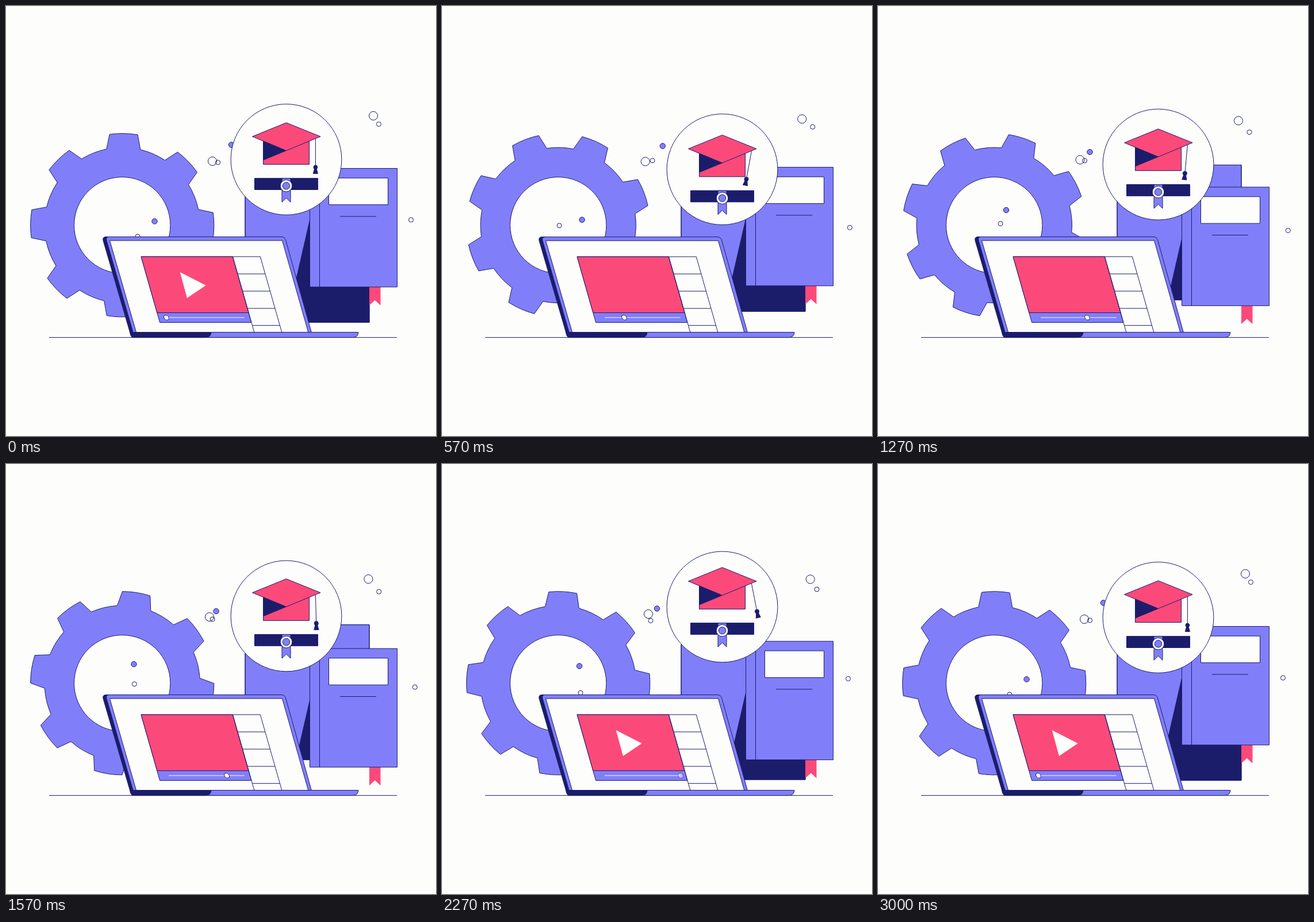
An HTML page with a canvas that plays this animation: 748 by 748 pixels, repeating every 3.03 s.

```html
<!DOCTYPE html>
<html lang="en">
<head>
<meta charset="utf-8">
<title>Online learning</title>
<style>
html, body { margin: 0; width: 100%; height: 100%; overflow: hidden; background: #fdfdfb; }
canvas { display: block; width: 748px; height: 748px; }
</style>
</head>
<body>
<canvas id="stage" width="748" height="748"></canvas>
<script>
const ctx = document.getElementById('stage').getContext('2d');
const WHITE = '#fdfdfb', PURPLE = '#807ff9', PINK = '#fb4a7a', NAVY = '#1b1d6b', LINE = '#1b1b70';
const LOOP = 3030, STEPS = 90, RAD = Math.PI / 180;
const KEYS = [0, 9, 25, 38, 55, 68];

const clamp = v => Math.max(0, Math.min(1, v));
const ease = v => { v = clamp(v); return v * v * (3 - 2 * v); };

// Smooth periodic curve through one value per key
function curve(n, vals) {
  const c = KEYS.length;
  const time = i => KEYS[(i + c) % c] + STEPS * Math.floor(i / c);
  const val = i => vals[(i + c) % c];
  const rate = i => (val(i + 1) - val(i)) / (time(i + 1) - time(i));
  const slope = i => {
    const a = time(i) - time(i - 1), b = time(i + 1) - time(i);
    return (rate(i - 1) * b + rate(i) * a) / (a + b);
  };
  n %= STEPS;
  let i = c - 1;
  while (KEYS[i] > n) i--;
  const h = time(i + 1) - time(i), u = (n - time(i)) / h, w = 1 - u;
  return val(i) * w * w * (1 + 2 * u) + val(i + 1) * u * u * (3 - 2 * u)
    + h * u * w * (slope(i) * w - slope(i + 1) * u);
}

function paint(fill, stroke) {
  if (fill) { ctx.fillStyle = fill; ctx.fill(); }
  if (stroke) { ctx.strokeStyle = stroke; ctx.stroke(); }
}

function poly(pts, fill, stroke = LINE) {
  ctx.beginPath();
  pts.forEach(([x, y]) => ctx.lineTo(x, y));
  ctx.closePath();
  paint(fill, stroke);
}

function box(x, y, w, h, fill, stroke = LINE) {
  ctx.beginPath();
  ctx.rect(x, y, w, h);
  paint(fill, stroke);
}

function disc(x, y, r, fill, stroke = LINE) {
  ctx.beginPath();
  ctx.arc(x, y, r, 0, 2 * Math.PI);
  paint(fill, stroke);
}

function line(x1, y1, x2, y2, color = LINE) {
  ctx.beginPath();
  ctx.moveTo(x1, y1);
  ctx.lineTo(x2, y2);
  paint(null, color);
}

function gear(n) {
  const x = 202.2, y = 381.3;
  ctx.beginPath();
  for (let i = 0; i < 8; i++) {
    const a = i * 45 - 89.1 + n * 4;
    ctx.arc(x, y, 135.2, (a - 32.4) * RAD, (a - 12.6) * RAD);
    ctx.arc(x, y, 159.6, (a - 8.8) * RAD, (a + 8.8) * RAD);
  }
  ctx.closePath();
  paint(PURPLE, LINE);
  disc(x, y, 83.7, WHITE);
}

const BUBBLES = [
  { r: 7.5, x: [639, 631, 624, 627, 634, 640.7], y: [191, 194, 198.5, 199.5, 200.5, 200.5] },
  { r: 4, x: [648.5, 646.5, 644, 646, 651, 652], y: [205.5, 208, 213, 219.5, 222.5, 218] },
  { r: 7.5, x: [359, 356.5, 351.5, 351.5, 356.5, 359], y: [270, 270.5, 270, 267.5, 264.5, 261] },
  { r: 4, x: [368.5, 368.5, 363, 359.5, 360, 363], y: [272, 269.5, 269, 269, 271, 272.5] },
  { r: 4, x: [229, 212.5, 202, 213, 232, 241], y: [401, 390, 377, 378.5, 388, 398] },
  { r: 4, x: [704.5, 706, 712.5, 713.3, 709, 706.5], y: [372, 379.5, 389.5, 390.5, 384, 373.5] },
  { r: 4.7, fill: PURPLE, x: [392, 389, 377.7, 368.5, 366, 374], y: [241.5, 240.5, 248, 254, 256, 251.5] },
  { r: 4.7, fill: PURPLE, x: [258.5, 253, 233.5, 223, 226, 239], y: [374.5, 374.5, 367, 355, 345.5, 351.5] }
];

function books(n) {
  const top = curve(n, [282.5, 277, 290, 315, 320, 308.3]);
  const low = curve(n, [550.3, 541.3, 521.5, 511.5, 523.5, 549]);
  const end = top + 206.3;

  box(416, low - 235, 216, 235, PURPLE);
  ctx.save();
  ctx.beginPath();
  ctx.rect(416, low - 235, 216, 235);
  ctx.clip();
  const from = top + 90;
  poly([[528.5, from], [528.5 - (600 - from) * 0.23, 600], [640, 600], [640, from]], NAVY);
  ctx.restore();
  box(416, low - 235, 216, 235, null);

  poly([[632, end], [651.5, end], [651.5, end + 32], [641.7, end + 23], [632, end + 32]], PINK, null);
  box(528.5, top, 152, 206.3, PURPLE);
  line(545.5, top, 545.5, end);
  box(561.5, top + 16.7, 103, 46.5, WHITE);
  line(581, top + 83.5, 644, top + 83.5);
}

function badge(n) {
  const wave = Math.sin(n * 4 * RAD);
  disc(487.5, 267 + 18.5 * wave, 96.4, WHITE);
  ctx.save();
  ctx.translate(0, 23.1 * wave);

  // Cap
  box(447.5, 231, 80, 44.5, PINK);
  poly([[447.5, 234.5], [487.5, 251.5], [447.5, 268]], NAVY);
  poly([[487.5, 203], [547, 227], [487.5, 251.5], [428.5, 227]], PINK);

  // Tassel
  ctx.save();
  ctx.translate(538.4, 231);
  ctx.rotate(11.2 * wave * RAD);
  line(0, 0, 0, 48);
  poly([[-1.5, 51], [1.5, 51], [4, 60.5], [-4, 60.5]], NAVY);
  disc(0, 49.5, 3.4, NAVY);
  ctx.restore();

  // Diploma
  box(432.5, 299.7, 110, 19.8, NAVY);
  poly([[480, 299.7], [495, 299.7], [495, 341.3], [487.5, 334], [480, 341.3]], PURPLE);
  disc(487.5, 312.8, 10.3, WHITE);
  disc(487.5, 312.8, 6.2, PURPLE);
  ctx.restore();
}

function laptop(n) {
  const press = Math.sin(clamp(n / 18) * Math.PI) ** 2;
  ctx.save();
  ctx.translate(0, 567.5);
  ctx.scale(1, 1 - 0.035 * press);
  ctx.translate(0, -567.5);

  // Lid
  ctx.beginPath();
  ctx.moveTo(180, 401.5);
  ctx.lineTo(174, 401.5);
  ctx.quadraticCurveTo(167.5, 401.5, 169, 408);
  ctx.lineTo(215.5, 567.5);
  ctx.lineTo(225, 567.5);
  ctx.closePath();
  paint(NAVY, LINE);
  ctx.beginPath();
  ctx.moveTo(221, 567.5);
  ctx.lineTo(175, 408);
  ctx.quadraticCurveTo(173.5, 401.5, 179, 401.5);
  ctx.lineTo(479, 401.5);
  ctx.quadraticCurveTo(485, 401.5, 486.8, 408);
  ctx.lineTo(531.3, 567.5);
  ctx.closePath();
  paint(PURPLE, LINE);
  poly([[180.5, 408], [480.5, 408], [525.8, 567.5], [226.5, 567.5]], WHITE);

  // Video and playlist
  poly([[235, 436], [394.3, 436], [426.9, 550.5], [267.6, 550.5]], PURPLE);
  poly([[235, 436], [394.3, 436], [422.1, 533.5], [262.8, 533.5]], PINK);
  line(394.3, 436, 431.8, 567.5);
  line(394.3, 436, 442.3, 436);
  line(442.3, 436, 479.8, 567.5);
  for (const y of [466, 496, 526, 555.7]) {
    const x = 394.3 + (y - 436) * 0.285;
    line(x, y, x + 48, y);
  }

  // Play button
  const size = n < 30 ? 1 - ease(n / 7) : ease((n - 59) / 7);
  if (size > 0) {
    ctx.save();
    ctx.translate(322, 486);
    ctx.scale(size, size);
    poly([[-19.3, -23], [25.7, 0], [-7, 22]], WHITE, null);
    ctx.restore();
  }

  // Progress
  line(283, 542, 414.5, 542, WHITE);
  const back = n >= 75;
  ctx.save();
  ctx.globalAlpha = back ? ease((n - 77) / 8) : 1 - ease((n - 64) / 8);
  ctx.transform(1, 0, 0.285, 1, back ? 279 : Math.min(415, 279 + 2.235 * n), 542);
  disc(0, 0, 4.2, WHITE);
  ctx.restore();
  ctx.restore();

  // Base
  slab(217, 613, PURPLE);
  slab(217, 357, NAVY);
}

function slab(x1, x2, fill) {
  ctx.beginPath();
  ctx.moveTo(x1 - 1.5, 567.5);
  ctx.lineTo(x2, 567.5);
  ctx.quadraticCurveTo(x2 - 0.5, 576.6, x2 - 10, 576.6);
  ctx.lineTo(x1 + 3, 576.6);
  ctx.quadraticCurveTo(x1, 575, x1 - 1.5, 567.5);
  paint(fill, LINE);
}

function draw(now) {
  const step = Math.min(STEPS, Math.floor((now % LOOP + 3.4) * 0.03));
  // The opening half second runs one step late
  const n = step < 17 ? Math.max(0, step - 1) : step;
  ctx.fillStyle = WHITE;
  ctx.fillRect(0, 0, 748, 748);
  ctx.lineWidth = 1;
  gear(n);
  for (const b of BUBBLES) disc(curve(n, b.x), curve(n, b.y), b.r, b.fill);
  books(n);
  badge(n);
  line(75, 576.6, 680, 576.6);
  laptop(n);
}

const start = performance.now();
function tick() {
  draw(performance.now() - start);
  requestAnimationFrame(tick);
}
tick();
</script>
</body>
</html>
```
